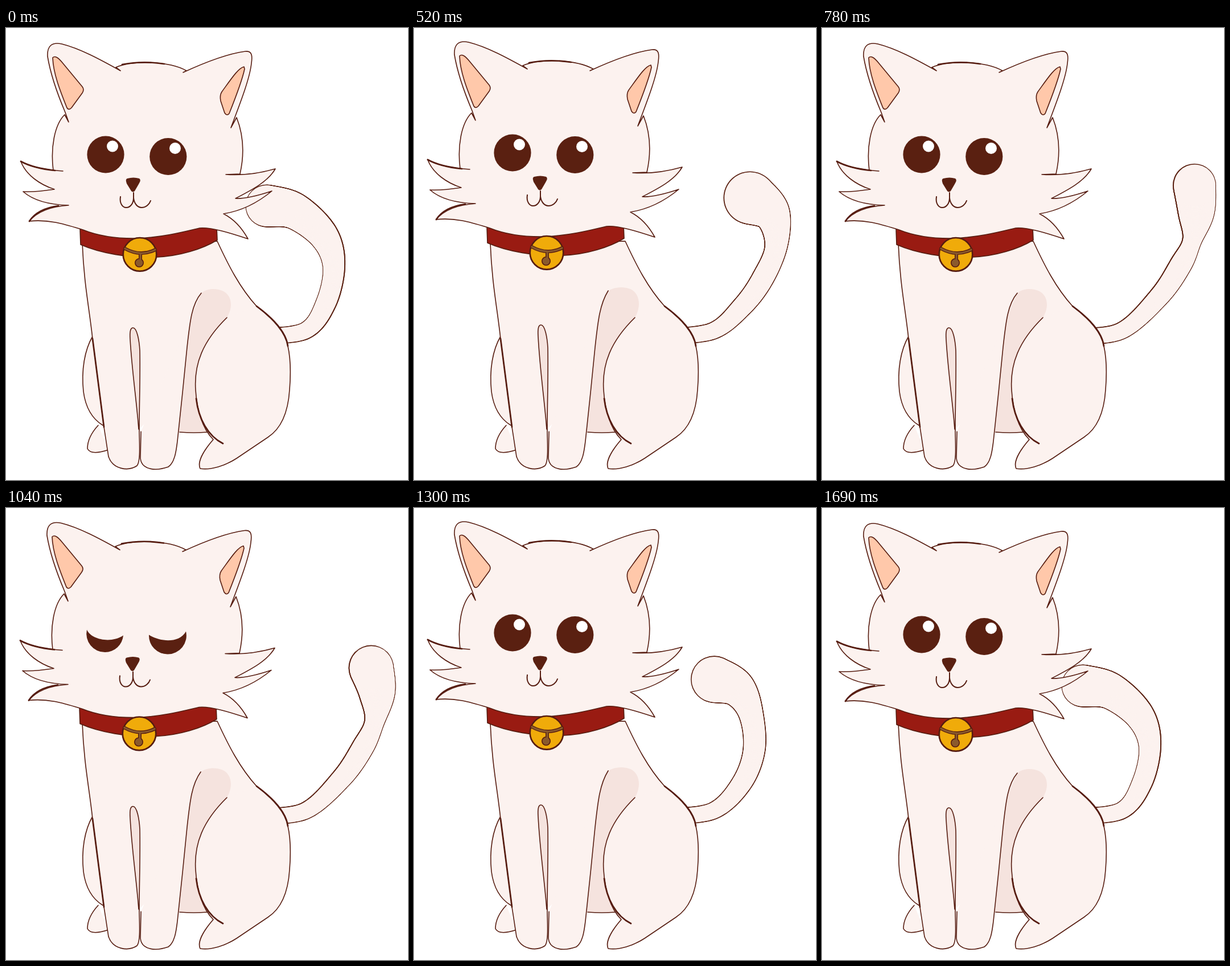
An HTML page for the animation above (1820 ms loop, 706 by 793 pixels).

```html
<!DOCTYPE html>
<html lang="en">
<head>
<meta charset="utf-8">
<title>Cat</title>
<style>
  html, body { margin: 0; width: 100%; height: 100%; overflow: hidden; background: #fff; }
  svg { display: block; width: 100%; height: 100%; }
  path, circle { fill: none; stroke-linecap: round; stroke-linejoin: round; }
  .line { stroke: #561c10; stroke-width: 1.6; }
  .bold { stroke: #561c10; stroke-width: 2.7; }
  .fur { fill: #fcf2ef; }
  .shade { fill: #f5e3de; }
  .ear { fill: #ffc8aa; }
  .dark { fill: #5a2011; }
  .glint { fill: #fff; }
  .red { fill: #991b12; }
  .gold { fill: #f0ab0a; }
  .brass { fill: #8a5a2c; }
</style>
</head>
<body>
<svg viewBox="0 0 706 793">
  <g id="tailInk" class="dark"></g>
  <g id="tailFur" class="fur"></g>

  <g id="body">
    <path class="fur line" d="M162 697C150 710 143 725 143 738C148 748 165 745 180 740"/>
    <path class="fur line" d="M152 541C138 565 132 600 136 638C140 668 152 686 170 697"/>
    <path class="fur line" d="M234 704C234 725 237 760 230 768C215 778 188 775 180 752L172 700L152 545C146 490 137 450 134 378L371 374C390 415 410 455 440 488"/>
    <path id="shade" class="shade"/>
    <path class="line" d="M305 709Q330 711 354 709"/>
    <path id="leg" class="fur line"/>
    <path id="gap" class="shade line"/>
    <path class="fur line" d="M440 488C470 510 492 535 495 558C500 580 500 610 498 635C495 680 480 705 460 718L405 755C385 768 360 776 341 773C335 760 350 738 364 722C344 702 335 668 333 635C330 590 345 550 388 508"/>
    <path class="bold" d="M440 488C470 510 492 535 495 558M334 650C338 686 355 716 381 729M152 545L172 700"/>
  </g>

  <g id="head">
    <path class="red line" d="M130 352L131 380C165 395 215 404 265 402C305 400 345 388 371 372L370 348Z"/>
    <path class="fur line" d="M83 250C78 210 85 170 103 152L110 165L104 148C90 115 78 80 73 50C72 32 80 24 98 28C130 36 165 55 201 75L193 69C220 57 285 57 317 75L311 78C350 60 390 45 420 41C432 40 433 48 431 62C428 90 410 135 395 175L405 157C418 190 418 225 411 256L386 257C415 259 445 255 473 247C460 270 430 285 403 299C420 300 440 295 467 286C450 300 420 320 382 326C400 335 415 352 425 370C395 360 360 349 340 351C310 358 280 366 235 369C200 370 165 366 135 354C105 345 75 335 41 339C55 322 80 313 110 311C70 310 45 300 30 287C45 288 65 286 85 283C60 275 35 258 26 234C45 245 70 249 100 251"/>
    <path class="bold" d="M204 64Q240 57 278 63M86 250Q48 246 26 234M92 312Q55 317 41 339"/>
    <path class="ear line" d="M82 52C86 48 92 52 100 62L134 103Q138 108 134 114L115 140Q110 145 107 140C95 110 83 80 82 52Z"/>
    <path class="ear line" d="M418 68C408 70 395 90 379 112Q375 118 377 128L384 149Q388 155 392 150C402 125 414 95 419 72Z"/>

    <g id="open">
      <circle class="dark" cx="175" cy="222" r="32.6"/>
      <circle class="dark" cx="284.8" cy="225.5" r="32.6"/>
      <circle class="glint" cx="187" cy="207.5" r="10"/>
      <circle class="glint" cx="297" cy="211" r="10"/>
    </g>
    <g id="shut">
      <path class="dark" d="M143 215C150 232 185 240 207 225A32.6 32.6 0 0 1 175 254.6A32.6 32.6 0 0 1 143 215Z"/>
      <path class="dark" d="M252 224C270 236 305 240 317 218A32.6 32.6 0 0 1 285 258A32.6 32.6 0 0 1 252 224Z"/>
    </g>

    <path class="dark" d="M213 264Q224 261 234 264Q238 266 233 274L226 286Q223 289 220 286L212 273Q209 265 213 264Z"/>
    <path class="line" style="stroke-width:2" d="M201 296C199 308 205 315 211 315C219 315 224 307 224 298V289M224 298C225 308 231 315 238 315C246 315 252 309 254 303"/>

    <circle class="gold bold" cx="235" cy="397.3" r="29.3"/>
    <path stroke="#561c10" stroke-width="6" d="M209 387Q236 402 262 389M236 396V408"/>
    <circle class="brass line" cx="234" cy="412" r="7.2"/>
    <path stroke="#8a5a2c" stroke-width="3.2" d="M209 387Q236 402 262 389M236 396V409"/>
  </g>
</svg>
<script>
const $ = id => document.getElementById(id);
const STEP = 130, HALF = 7;

// Tail spine from rump to tip, then the tip radius
const poses = [
  [562,483, 576,418, 558,364, 507,321, 458,312, 37],
  [574,481, 590,415, 568,347, 535,311, 495,302, 38],
  [577,488, 612,440, 636,382, 628,325, 590,298, 46],
  [592,471, 630,415, 650,372, 657,322, 654,276, 37.5]
];
const swing = [0, .5, 1, 1.34, 2, 2.8, 3];

const mix = (a, b, t) => a + (b - a) * t;

// Catmull-Rom between p1 and p2
function curve(p0, p1, p2, p3, t) {
  return p1 + t * ((p2 - p0) + t * ((2 * p0 - 5 * p1 + 4 * p2 - p3) + t * (3 * (p1 - p2) + p3 - p0))) / 2;
}

function spineAt(s) {
  const i = Math.min(Math.floor(s), poses.length - 2);
  const v = poses[i].map((n, j) => mix(n, poses[i + 1][j], s - i));
  const radii = [18, 19.5, 26 - 3 * s, 32, v[10]];
  return [[450, 541, 14], [526, 531, 15], ...radii.map((r, j) => [v[2 * j], v[2 * j + 1], r])];
}

// The tail is a row of overlapping discs: dark ones, then lighter, smaller ones on top
function drawTail(s) {
  const pts = spineAt(s), last = pts.length - 1, dots = 24;
  const side = (s - 1.5) * .35;
  let ink = '', fur = '';
  for (let n = 0; n <= last * dots; n++) {
    const i = Math.min(Math.floor(n / dots), last - 1), t = n / dots - i;
    const at = k => pts[Math.max(0, Math.min(last, k))];
    const [x, y, r] = [0, 1, 2].map(k => curve(at(i - 1)[k], at(i)[k], at(i + 1)[k], at(i + 2)[k], t));
    const disc = (dx, dr) => `<circle style="fill:inherit" cx="${x + dx}" cy="${y}" r="${r + dr}"/>`;
    ink += disc(0, .6);
    fur += disc(side, -1);
  }
  $('tailInk').innerHTML = ink;
  $('tailFur').innerHTML = fur;
}

function drawBody(b) {
  const x = 343 - 2 * b, y = 465 - 4 * b, top = 458 - 3 * b, gap = 526 - 5 * b;
  const leg = `L310 640L318 560C323 515 326 485 ${x} ${y}`;
  $('leg').setAttribute('d', `M237 708L236 755C238 775 262 778 285 770C297 762 299 740 301 725${leg}`);
  $('shade').setAttribute('d', `M303 709${leg}C352 ${top - 1} 368 ${top - 2} 380 ${top + 3}C396 ${top + 10} 400 488 388 508C345 550 330 590 333 635C335 670 344 693 354 709Z`);
  $('gap').setAttribute('d', `M233 704C230 660 221 600 218 ${gap + 20}C217 ${gap + 5} 219 ${gap} 223 ${gap}C230 ${gap} 234 ${gap + 22} 235 ${gap + 40}C236 610 234 660 234 704`);
  $('head').setAttribute('transform', `translate(${-2 * b} ${-3 * b})`);
}

let shown = -1;
function frame() {
  const step = Math.floor(performance.now() / STEP) % (2 * HALF);
  if (step !== shown) {
    shown = step;
    const k = Math.min(step, 2 * HALF - 1 - step); // there and back
    const blink = step === 8 || step === 9;
    drawTail(swing[k]);
    drawBody(Math.min(1, k / 2, (6 - k) / 2));
    $('open').style.display = blink ? 'none' : '';
    $('shut').style.display = blink ? '' : 'none';
  }
  requestAnimationFrame(frame);
}
frame();
</script>
</body>
</html>
```
